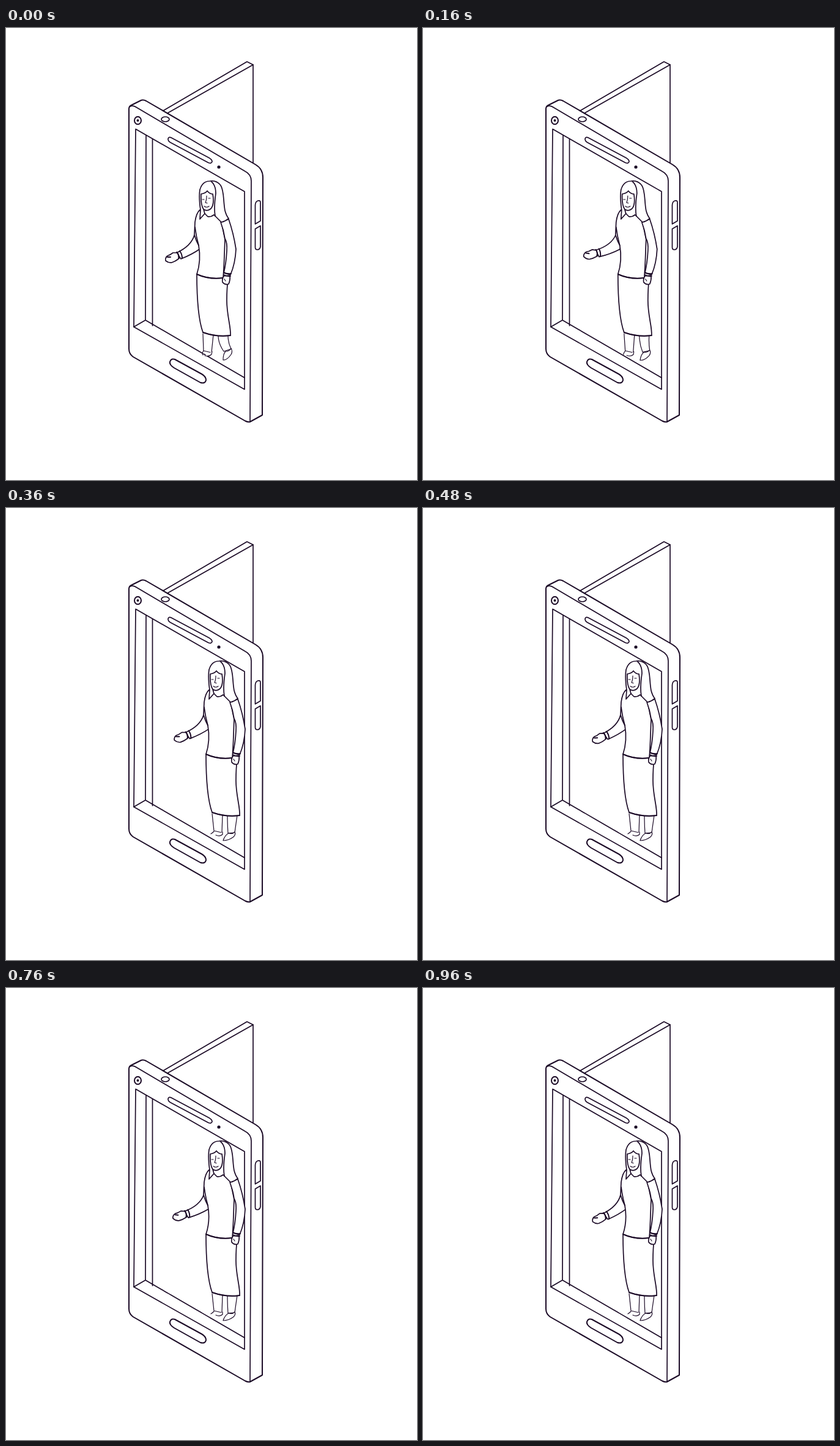
Animation, 672 px wide and 738 px high, one loop 1000 ms. Source, as an HTML page:

```html
<!DOCTYPE html>
<html lang="en">
<head>
<meta charset="utf-8">
<title>Phone doorway</title>
<style>
  html, body { margin: 0; width: 100%; height: 100%; overflow: hidden; background: #fff; }
  svg { display: block; width: 100%; height: 100%; }
  path, ellipse, circle { fill: #fff; stroke: #1b0a26; stroke-width: 1.7; stroke-linejoin: round; stroke-linecap: round; }
  .line { fill: none; }
  .bold { stroke-width: 2; }
  .thin { stroke-width: 1.2; }
  .dot { fill: #1b0a26; stroke: none; }
</style>
</head>
<body>
<svg viewBox="0 0 672 738">
  <!-- door behind the phone -->
  <path d="M257 135 L394 55 L404 60 V226 L300 190 Z"/>
  <path class="line" d="M264 139 L404 60"/>

  <!-- phone body -->
  <path class="bold" d="M201 132 Q201 128 205 126 L220 118.500 Q224 116.500 229 119 L408 223 Q420 230 420 244 L419 632 L399 643 Q396 644 391 641.500 L208 537 Q201 532 201 524 Z"/>
  <path class="line" d="M203 128 Q208 125.500 214 130 L391 234 Q401 239 401 250 L399 643"/>
  <ellipse cx="260.500" cy="149" rx="6.500" ry="4"/>
  <ellipse class="bold" cx="215.500" cy="151" rx="5.500" ry="6.300"/>
  <circle class="dot" cx="215.500" cy="151" r="2"/>
  <path d="M270 179 L332 212 Q337 215 337 218 Q336 222 331 220 L269 187 Q265 185 265 181 Q266 177 270 179 Z"/>
  <circle class="dot" cx="348" cy="227" r="2.600"/>
  <path d="M407.500 289 Q408 283 412 282 Q416 281 416 285 V315 L407.500 320 Z"/>
  <path d="M407.500 328 L416 323 V357 Q415 362 411 362 Q407.500 362 407.500 358 Z"/>
  <path class="bold" d="M276 541 L320 565 Q327 569 327 575 Q326 581 318 579 L275 555 Q267 550 268 545 Q270 539 276 541 Z"/>

  <!-- opening -->
  <path d="M212 165 L390 267 V590 L209 488 Z"/>
  <path class="line" d="M229 175 L228 477 M239.500 181 V486 M209 488 L228 477 L390 571"/>

  <g id="woman">
    <path id="legs" class="thin"/>
    <path id="shoes" class="thin"/>
    <path d="M312 402 C312 440 314 475 322 497 Q345 505 367 502 C368 488 361 470 361 445 Q361 425 363 410 Z"/>
    <path class="line bold" d="M322 497 Q345 505 367 502"/>

    <g id="arm">
      <path d="M308 338 C304 352 292 361 279 367 L286 377 Q304 370 318 360 L322 345 Z"/>
      <path d="M280 367 L273 367 Q268 371 264 372 Q260 375 261 380 Q266 384 271 383 Q277 381 282 377 Q283 371 280 367 Z"/>
      <path class="line bold" d="M279 366 Q283 370 283 376 M284 364 Q288 369 288 376 M264 374 L269 374"/>
    </g>

    <path d="M317 297 Q311 302 309 317 L308 338 Q311 348 315 355 C318 372 316 390 312 402 Q332 411 355 408 C357 385 357 365 358 345 L352 316 L341 305 Z"/>
    <path class="line bold" d="M312 402 Q332 411 355 408"/>
    <path class="line" d="M309 325 Q311 341 315 355"/>

    <path d="M356 405 Q353 410 354 415 Q358 420 364 418 Q367 411 366 404 Z"/>
    <path d="M351 317 Q356 330 358 344 Q362 350 361 364 Q360 384 356 400 L367 403 Q375 384 376 361 Q372 335 364 312 Z"/>
    <path class="line bold" d="M356 399 Q361 402 368 401 M356 403 Q361 406 367 405"/>
    <path class="line thin" d="M357 410 L359 413"/>

    <!-- head -->
    <path d="M318 297 Q315 276 317 264 Q321 250 333 250 Q344 248 351 257 C357 266 355 283 358 298 Q360 306 364 311 Q358 316 352 317 L342 307 L340 305 Q335 309 330 308 L325 303 L317 312 Z"/>
    <path class="line" d="M319 271 Q318 288 323 296 Q329 300 335 295 Q341 288 338 271 M319 271 Q326 270 329 266 Q333 271 338 271 M323 296 L325 303 M336 251 Q343 257 343 270 C341 284 340 296 342 307"/>
    <path class="line thin" d="M328 274 Q328 281 326 285 L329 286 M321 280 L324 280 M331 278 L334 278 M324 291 Q328 294 332 291"/>
  </g>
</svg>
<script>
const LOOP = 1000, STEP = 40, SLIDE = 15, SLIDE_MS = 355;
// time in ms, forearm angle in degrees
const swing = [[0, 0], [150, 8], [240, 4.5], [360, 1], [460, -2], [600, 1.7], [720, 5.3], [760, 4.6], [960, -2]];
const el = id => document.getElementById(id);

function slope(i) {
  const a = swing[i - 1], b = swing[i], c = swing[i + 1];
  if (!a || !c || (b[1] - a[1]) * (c[1] - b[1]) <= 0) return 0;
  return (c[1] - a[1]) / (c[0] - a[0]);
}

function armAngle(t) {
  let i = 0;
  while (i < swing.length - 2 && t > swing[i + 1][0]) i++;
  const [t0, a] = swing[i], [t1, b] = swing[i + 1];
  const h = t1 - t0, u = (t - t0) / h, v = 1 - u;
  return v * v * (1 + 2 * u) * a + u * u * (3 - 2 * u) * b
    + h * u * v * (v * slope(i) - u * slope(i + 1));
}

function draw(t) {
  const p = Math.min(1, t / SLIDE_MS);
  const mix = (a, b) => (a + (b - a) * p).toFixed(2);
  // a point given on the stage at the start and the end of the slide
  const pt = (x, y, x2, y2) => mix(x, x2 - SLIDE) + ' ' + mix(y, y2) + ' ';

  el('woman').setAttribute('transform', `translate(${SLIDE * p} 0)`);
  el('arm').setAttribute('transform', `rotate(${armAngle(t)} 308 340)`);
  el('legs').setAttribute('d',
    'M322 499 L' + pt(323, 527, 340, 527) + 'L' + pt(336, 530, 353, 530) + 'L339 501' +
    'M347 502 Q' + pt(347, 515, 362, 517) + pt(356, 528, 363, 531) +
    'L' + pt(368, 524, 374, 530) + 'Q' + pt(363, 514, 376, 515) + '363 502');
  el('shoes').setAttribute('d',
    'M' + pt(323, 527, 340, 528) + 'Q' + pt(320, 531, 337, 531) + pt(322, 534, 335, 532) +
    'M' + pt(325, 535, 343, 534) + 'Q' + pt(332, 537, 350, 537) + pt(336, 533, 354, 533) +
    'L' + pt(337, 528, 354, 529) +
    'M' + pt(355, 542, 355, 543) + 'Q' + pt(355, 532, 358, 534) + pt(359, 528, 364, 531) +
    'Q' + pt(365, 528, 370, 533) + pt(368, 523, 374, 529) +
    'Q' + pt(371, 528, 376, 533) + pt(368, 533, 372, 537) +
    'Q' + pt(361, 543, 364, 543) + pt(355, 542, 355, 543));
}

const start = performance.now();
function tick() {
  const t = (performance.now() - start) % LOOP;
  draw(Math.floor(t / STEP) * STEP);
  requestAnimationFrame(tick);
}
tick();
</script>
</body>
</html>
```
